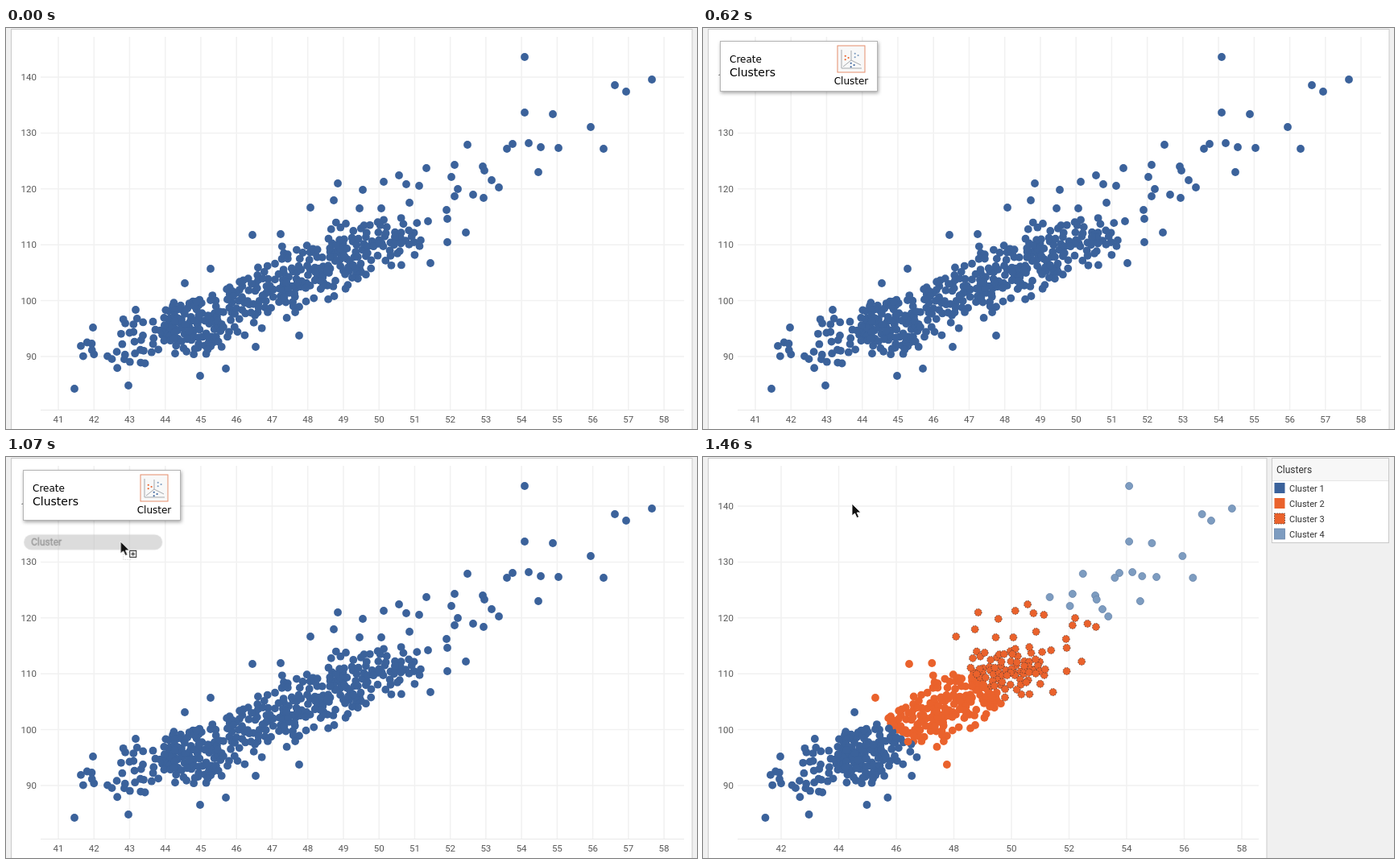
Recreate the animation shown at these times as an HTML page. Size 858 by 498 pixels, loop 5.46 s.

```html
<!DOCTYPE html>
<html lang="en">
<head>
<meta charset="utf-8">
<title>Scatter plot clustering</title>
<style>
html, body { margin: 0; width: 100%; height: 100%; overflow: hidden; background: #f0f0f0; }
svg { display: block; width: 858px; height: 498px; }
text { font-family: Roboto, "Open Sans", sans-serif; }
.axis { font-size: 11.5px; fill: #585858; }
.legend { font-size: 11px; fill: #333; }
.menu text { font-family: "DejaVu Sans", "Open Sans", sans-serif; font-size: 12px; fill: #000; }
.menu .big { font-size: 14px; }

#plain, #grouped, #menu, .hover, #badge { animation: 5460ms step-end infinite; }
#plain { animation-name: plain; }
#grouped { animation-name: grouped; }
#menu { animation-name: menu; }
.hover { animation-name: hover; }
#badge { animation-name: badge; }
#pill { animation: pill 5460ms linear infinite; }
#cursor { animation: cursor 5460ms linear infinite; }

@keyframes plain { 0% { visibility: visible; } 25.64%, 100% { visibility: hidden; } }
@keyframes grouped { 0% { visibility: hidden; } 25.64%, 100% { visibility: visible; } }
@keyframes menu { 0% { opacity: 0; } 11.35% { opacity: 1; } 24.54%, 100% { opacity: 0; } }
@keyframes hover { 0% { opacity: 0; } 22.34% { opacity: 1; } 24.54%, 100% { opacity: 0; } }
@keyframes badge { 0% { opacity: 1; } 24.54%, 100% { opacity: 0; } }
@keyframes pill {
  0%, 11.9% { transform: translate(-190px, 205px); }
  14.652% { transform: translate(-95px, 168px); }
  17.399% { transform: translate(-8px, 123px); }
  19.597% { transform: translate(22px, 106px); }
  23.993%, 24.53% { transform: translate(76px, 57px); opacity: 1; }
  24.54%, 100% { transform: translate(76px, 57px); opacity: 0; }
}
@keyframes cursor {
  0%, 12.45% { transform: translate(-50px, 206px); }
  14.652% { transform: translate(24px, 174px); }
  17.399% { transform: translate(118px, 127px); }
  19.597% { transform: translate(142px, 105px); }
  23.993% { transform: translate(187px, 63px); }
  26.74%, 100% { transform: translate(185px, 58px); }
}
</style>
</head>
<body>
<svg viewBox="0 0 858 498">
  <rect width="858" height="498" fill="#f0f0f0"/>
  <g id="plain"></g>
  <g id="grouped"></g>

  <g id="menu" class="menu">
    <rect x="21.5" y="16.5" width="195" height="62" fill="#fff" stroke="#b4b4b4"
      style="filter: drop-shadow(1px 2px 2px rgba(0,0,0,.35))"/>
    <rect class="hover" x="152" y="17" width="64" height="61" fill="#dadada"/>
    <text x="33" y="43">Create</text>
    <text x="33" y="60" class="big">Clusters</text>
    <text x="184" y="70" text-anchor="middle">Cluster</text>
    <rect x="167" y="22" width="34" height="33" fill="#f8f8f8" stroke="#e58e6c"/>
    <rect class="hover" x="167.5" y="22.5" width="33" height="32" fill="#f6ad8b"/>
    <path d="M172 27V50H197M184 28V40L174 48M184 40L196 46" fill="none" stroke="#a5a9ad"/>
    <g id="specks"></g>
  </g>

  <g id="pill">
    <rect y="-9.5" width="172" height="19" rx="9.5" fill="#bdbdbd" opacity=".53"/>
    <text x="9" y="4" font-size="12" fill="#949494" stroke="#949494" stroke-width=".3">Cluster</text>
  </g>

  <g id="cursor">
    <g id="badge">
      <rect x="3.5" y="13.5" width="9" height="9" fill="#fff" fill-opacity=".6" stroke="#bbb" stroke-dasharray="1 2"/>
      <rect x="11.5" y="11.5" width="8" height="8" fill="#fff" stroke="#222"/>
      <path d="M13 15.5h5M15.5 13v5" stroke="#222"/>
    </g>
    <path d="M0 0V15L3.5 12L6 17.6L8.6 16.4L6.2 11H11Z" fill="#111" stroke="#fff" stroke-width=".9"/>
  </g>
</svg>
<script>
const NS = "http://www.w3.org/2000/svg";
const BLUE = "#3b629b", ORANGE = "#ea622c", PALE = "#7d9cc0", DARK = "#4a3834";
const plain = document.getElementById("plain");
const grouped = document.getElementById("grouped");

function add(parent, tag, attrs, text) {
  const el = document.createElementNS(NS, tag);
  for (const key in attrs) el.setAttribute(key, attrs[key]);
  if (text !== undefined) el.textContent = text;
  parent.appendChild(el);
  return el;
}

function line(parent, d, color, width = 1.5) {
  add(parent, "path", { d, stroke: color, "stroke-width": width, fill: "none" });
}

// Outliers: x, y pairs
const outliers = [
  644,36, 802,64, 756,71, 770,79, 644,105, 679,107, 726,123, 742,150, 629,144, 622,150,
  649,143, 664,148, 686,149, 661,179, 573,145, 592,172, 594,177, 603,189, 612,198, 557,170,
  553,185, 561,200, 557,209, 580,207, 593,211, 547,226, 548,237, 548,266, 571,254, 522,174,
  513,196, 488,183, 497,194, 524,240, 527,292, 469,191, 443,201, 412,193, 501,217, 466,224,
  439,224, 407,214, 378,223, 341,256, 306,257, 254,299, 222,317, 161,350, 108,372, 85,448,
  152,444, 241,432, 273,423, 310,396, 364,382
];

// Cloud slices: x, top, bottom, points up to the next slice
const slices = [
  [88, 386, 412, 10], [140, 360, 434, 28], [195, 344, 410, 92], [262, 318, 404, 86],
  [345, 272, 360, 88], [420, 236, 332, 36], [450, 236, 306, 44], [516, 228, 298, 0]
];

let seed = 20;
function rnd() {
  seed = (seed * 1664525 + 1013904223) % 4294967296;
  return seed / 4294967296;
}

const mix = (a, b, k) => a + (b - a) * k;
const points = [];
for (let i = 0; i < outliers.length; i += 2) points.push([outliers[i], outliers[i + 1]]);
for (let i = 0; i < slices.length - 1; i++) {
  const [x0, top0, bottom0, count] = slices[i];
  const [x1, top1, bottom1] = slices[i + 1];
  for (let n = 0, tries = 0; n < count && tries < 3000; tries++) {
    const k = rnd();
    const x = mix(x0, x1, k);
    const y = mix(mix(top0, top1, k), mix(bottom0, bottom1, k), 0.5 + (rnd() + rnd() - 1) * 0.54);
    if (points.some(p => Math.hypot(p[0] - x, p[1] - y) < 4)) continue;
    points.push([x, y]);
    n++;
  }
}

function chart(g, right, x0, first, step, unit) {
  add(g, "rect", { x: 6.5, y: 1.5, width: right - 6.5, height: 500, fill: "#fff", stroke: "#c9c9c9" });
  const end = right - 10;
  for (let v = first; v <= 58; v += step) {
    const x = x0 + (v - first) * unit;
    line(g, `M${x} 11V474`, "#f1f1f1");
    add(g, "text", { x, y: 490, class: "axis", "text-anchor": "middle" }, v);
  }
  for (let v = 90; v <= 140; v += 10) {
    const y = 408 - (v - 90) * 6.94;
    line(g, `M43 ${y}H${end}`, "#f1f1f1");
    add(g, "text", { x: 38, y: y + 4, class: "axis", "text-anchor": "end" }, v);
  }
  line(g, `M43 474.5H${end}`, "#e9e9e9", 1);
}

function clusterOf(x, y) {
  if (y > 312 + (x - 196) * 0.71) return 1;
  if (y < 175 + (x - 415) * 0.38) return 4;
  return y < 245 + (x - 310) * 0.85 ? 3 : 2;
}

const looks = {
  1: { fill: BLUE },
  2: { fill: ORANGE },
  3: { fill: ORANGE, stroke: DARK, "stroke-width": 0.9, "stroke-dasharray": "1.3 1.7" },
  4: { fill: PALE, stroke: "#6986ab", "stroke-width": 0.8 }
};

chart(plain, 852, 65, 41, 1, 44.24);
chart(grouped, 700, 97, 42, 2, 35.75);
for (const [x, y] of points) {
  add(plain, "circle", { cx: x, cy: y, r: 4.9, fill: BLUE });
  const gx = 97 + ((x - 65) / 44.24 - 1) * 35.75;
  const type = clusterOf(gx, y);
  add(grouped, "circle", { cx: gx, cy: y, r: type > 2 ? 4.5 : 4.9, ...looks[type] });
}

add(grouped, "rect", { x: 706.5, y: 1.5, width: 145, height: 105, fill: "#fff", stroke: "#c9c9c9" });
add(grouped, "rect", { x: 707, y: 2, width: 144, height: 27, fill: "#f7f7f7" });
line(grouped, "M707 29.5H851", "#e6e6e6", 1);
add(grouped, "text", { x: 712, y: 20, "font-size": 12, fill: "#333" }, "Clusters");
for (let i = 1; i <= 4; i++) {
  const y = 19 + i * 19;
  add(grouped, "rect", { x: 709.5, y: y - 6, width: 13, height: 13, ...looks[i] });
  add(grouped, "text", { x: 728, y: y + 5, class: "legend" }, "Cluster " + i);
}

// Three small triples of dots in the menu icon
const specks = document.getElementById("specks");
for (const [x, y, fill] of [[178, 37, ORANGE], [190, 34, PALE], [185, 46, BLUE]]) {
  for (let a = 0; a < 3; a++) {
    add(specks, "circle", { cx: x + 2.6 * Math.cos(a * 2.1), cy: y + 2.6 * Math.sin(a * 2.1), r: 1.1, fill });
  }
}
</script>
</body>
</html>
```
